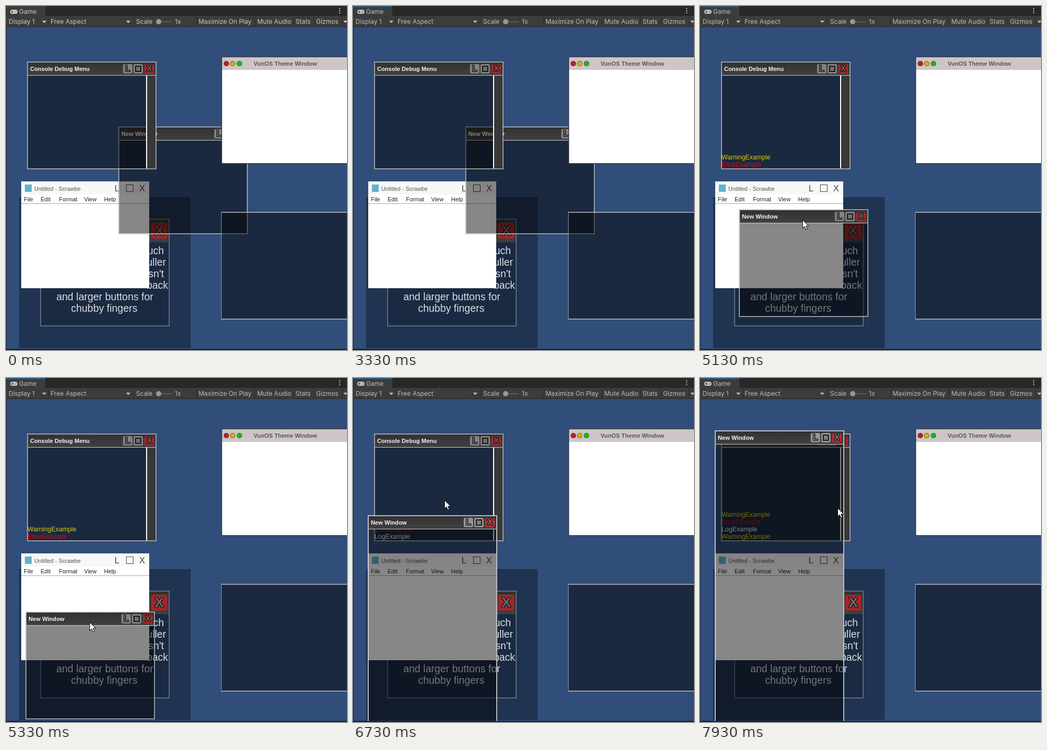
Recreate the animation shown at these times as an HTML page. Size 650x657 px, loop 8000 ms.

```html
<!DOCTYPE html>
<html lang="en">
<head>
<meta charset="utf-8">
<title>Game view</title>
<style>
  *, *::after { box-sizing: border-box; }
  html, body { margin: 0; width: 100%; height: 100%; overflow: hidden; background: #191919; }
  #stage { position: relative; width: 650px; height: 657px; overflow: hidden; background: #151d2c;
    font-family: "Liberation Sans", Arial, sans-serif; }
  #stage div, #stage span, #stage svg { position: absolute; white-space: pre; }

  /* editor bars */
  #bars { inset: 0 0 auto 0; height: 40px; background: #282828; color: #cacaca;
    font: 12px/16px Inter, sans-serif; }
  #bars.dim { color: #bdbdbd; }
  #tab { left: 1px; top: 0; width: 74px; height: 20px; background: #3c3c3c; }
  #tab.focus { border-top: 2px solid #2c5d87; }
  #tools { left: 0; top: 19px; width: 650px; height: 21px; background: #3c3c3c; border-bottom: 1px solid #232323; }
  #bars span { top: 22px; }
  #bars i { position: absolute; top: 20px; width: 1px; height: 19px; background: #2a2a2a; }
  #bars svg { left: 0; top: 0; }

  /* game view */
  #view { inset: 0; background: #314d79; clip-path: inset(40px 0 2px 1px); }
  .win { width: 247px; height: 206px; background: rgba(0,0,0,.47); border: 2px solid rgba(255,255,255,.55); }
  .win.lit { border-color: rgba(255,255,255,.7); }
  .bar { left: 0; right: 0; top: 0; height: 25px; border-bottom: 1px solid #c9ccd0;
    background: linear-gradient(#323232, #404040); color: #f2f2f2; font: bold 11.1px/24px "Liberation Sans", Arial, sans-serif; }
  .bar > span { left: 4px; }
  .btn { top: 3px; width: 18px; height: 18px; border-radius: 3px; background: #828282;
    color: #686868; font: bold 16px/18px "Liberation Sans", Arial, sans-serif; text-align: center;
    text-shadow: 1px 0 #111, -1px 0 #111, 0 1px #111, 0 -1px #111, 1px 1px #111, -1px -1px #111, 1px -1px #111, -1px 1px #111; }
  .btn:nth-child(2) { left: 181px; }
  .btn:nth-child(3) { left: 201px; }
  .btn:nth-child(4) { left: 222px; }
  .btn.max::after { content: ""; position: absolute; left: 3px; top: 3px; width: 12px; height: 12px; border: 2px solid #161616; background: #6e6e6e; }
  .btn.x { background: #aa2428; }
  .lit .btn { filter: brightness(1.14); }

  #logs { left: 0; bottom: 0; width: 224px; font-size: 12.3px; line-height: 14px; }
  #logs p { margin: 0 0 0 -1px; }
  .warn { color: #dccd0c; }
  .err { color: #d60c14; }
  .log { color: #eceef0; }
  #scroll { right: 0; top: 25px; bottom: 0; width: 18px; background: #383838; border-left: 2px solid #fff; }

  #shade { left: 25px; top: 365px; width: 327px; height: 288px; background: rgba(0,0,0,.34); }
  #touch { left: 65px; top: 406px; width: 247px; height: 206px; background: rgba(0,0,0,.18);
    border: 2px solid rgba(255,255,255,.3); color: #dadde0; font-size: 19.45px; line-height: 22px; }
  #touch .bar { height: 43px; border: 0; }
  #touch .btn { left: 210px; top: 6px; width: 30px; height: 30px; border-radius: 4px; font-size: 28px; line-height: 30px; }
  #touch > span { width: max-content; }

  #note { left: 29px; top: 335px; width: 244px; height: 204px; background: #fff; color: #222; font-size: 11px; line-height: 16px; }
  #note .head { left: 0; top: 0; width: 244px; height: 25px; background: #f8f8f8; }
  #note .rule { left: 0; top: 42px; width: 244px; height: 1px; background: #a8a8a8; }
  #note .icon { left: 7px; top: 6px; width: 13px; height: 14px; background: #62b3c9; }
  #note .box { left: 200px; top: 6px; width: 14px; height: 14px; border: 1px solid #444; }
  #note .big { top: 5px; font-size: 16.5px; color: #444; }
  #note .menu { top: 26px; }

  #light { left: 411px; top: 97px; width: 260px; height: 204px; background: #fff; border: 1px solid #4c4c50;
    border-radius: 4px 0 0 2px; box-shadow: 0 0 0 1px rgba(60,60,64,.45); }
  #light .head { left: 0; top: 0; width: 258px; height: 24px; border-radius: 3px 0 0 0; background: #cdc5c6; color: #56565a;
    font: bold 11.1px/24px "Liberation Sans", Arial, sans-serif; }
  #light .dot { top: 7px; width: 10px; height: 10px; border-radius: 50%; border: 1px solid rgba(40,30,30,.6); }
  #panel { left: 410px; top: 393px; width: 260px; height: 206px; background: rgba(0,0,0,.47);
    border: 2px solid rgba(255,255,255,.55); border-left-width: 1px; }
  #stage svg.cursor { left: 0; top: 0; z-index: 2; overflow: visible; }
</style>
</head>
<body>
<div id="stage">
  <div id="view">
    <div id="shade"></div>
    <div id="touch">
      <div class="bar"><div class="btn x">X</div></div>
      <span style="right:9px;top:48px">suits touch</span>
      <span style="right:5px;top:70px">has a fuller</span>
      <span style="right:9px;top:92px">and doesn't</span>
      <span style="right:1px;top:114px">back</span>
      <span style="left:29px;top:136px">and larger buttons for</span>
      <span style="left:57px;top:158px">chubby fingers</span>
    </div>
    <div id="note">
      <div class="head"></div>
      <div class="icon"></div>
      <span style="left:25px;top:6px;font-size:10.8px;color:#555">Untitled - Scrawbe</span>
      <span class="big" style="left:178px">L</span>
      <div class="box"></div>
      <span class="big" style="left:225px">X</span>
      <span class="menu" style="left:5px">File</span>
      <span class="menu" style="left:37px">Edit</span>
      <span class="menu" style="left:72px">Format</span>
      <span class="menu" style="left:120px">View</span>
      <span class="menu" style="left:158px">Help</span>
      <div class="rule"></div>
    </div>
    <div id="fresh" class="win">
      <div class="bar"><span>New Window</span><div class="btn">L</div><div class="btn max"></div><div class="btn x">X</div></div>
    </div>
    <div class="win" style="left:40px;top:106px">
      <div class="bar"><span>Console Debug Menu</span><div class="btn">L</div><div class="btn max"></div><div class="btn x">X</div></div>
      <div id="logs"></div>
      <div id="scroll"></div>
    </div>
    <div id="light">
      <div class="head"><span style="left:60px">VunOS Theme Window</span></div>
      <div class="dot" style="left:3px;background:#b8222b"></div>
      <div class="dot" style="left:15px;background:#d9ae14"></div>
      <div class="dot" style="left:28px;background:#16bd1c"></div>
    </div>
    <div id="panel"></div>
    <svg id="arrow" class="cursor" width="13" height="20">
      <path d="M.5 .5V16.5L4.2 13L6.7 19L9.4 17.9L6.9 12H12Z" fill="#fff" stroke="#000"/>
    </svg>
    <svg id="sizer" class="cursor" width="11" height="23">
      <path d="M0 -11L5 -6H1.5V6H5L0 11L-5 6H-1.5V-6H-5Z" fill="#fff" stroke="#000"/>
    </svg>
  </div>

  <div id="bars">
    <div id="tab"></div>
    <div id="tools"></div>
    <span style="left:25px;top:3px">Game</span>
    <span style="left:5px">Display 1</span>
    <span style="left:85px">Free Aspect</span>
    <span style="left:248px">Scale</span>
    <span style="left:322px">1x</span>
    <span style="left:367px">Maximize On Play</span>
    <span style="left:479px">Mute Audio</span>
    <span style="left:552px">Stats</span>
    <span style="left:591px">Gizmos</span>
    <i style="left:81px"></i><i style="left:242px"></i><i style="left:363px"></i><i style="left:474px"></i>
    <i style="left:548px"></i><i style="left:586px"></i><i style="left:640px"></i>
    <svg width="650" height="40" fill="currentColor">
      <path d="M69 28h8l-4 4.5zM229 28h8l-4 4.5zM643 28h8l-4 4.5z"/>
      <path d="M635 4h2v2h-2zM635 8h2v2h-2zM635 12h2v2h-2z"/>
      <path d="M295 29.5h21v1.5h-21z" fill="#666"/>
      <circle cx="291" cy="30" r="5" fill="#999"/>
      <rect x="8" y="7" width="14" height="8" rx="4"/>
      <path d="M10 11h4M12 9v4M17 11.7h1M19 10h1" stroke="#3c3c3c" stroke-width="1.2"/>
    </svg>
  </div>
</div>

<script>
const $ = id => document.getElementById(id);
const LOOP = 8000, FPS = 15;

// rows of [tick, x, y]
const winPath = [[72, 214, 230], [73, 210, 238], [77, 74, 388], [79, 46, 432], [81, 28, 460],
  [97, 28, 460], [98, 28, 444], [99, 28, 398], [103, 28, 126], [104, 28, 78], [105, 28, 52], [106, 28, 42],
  [108, 28, 42], [109, 28, 74], [110, 28, 100]];
const pointer = [[61, 341, 469], [64, 340, 400], [67, 337, 262], [68, 336, 239], [69, 336, 249], [72, 336, 249],
  [73, 332, 257], [77, 195, 408], [79, 167, 452], [81, 150, 480], [84, 181, 471], [85, 181, 471],
  [86, 178, 470], [87, 178, 470], [88, 177, 463], [92, 177, 463], [93, 176, 458], [97, 176, 458],
  [98, 176, 420], [99, 175, 365], [103, 172, 100], [104, 171, 61], [105, 173, 46], [106, 174, 40],
  [108, 174, 40], [109, 178, 72], [110, 180, 97], [111, 180, 97], [112, 190, 112], [114, 238, 190],
  [116, 271, 245], [117, 271, 245], [118, 267, 247], [119, 262, 248]];
const logs = [[61, "warn", "Warning"], [76, "err", "Error"], [91, "log", "Log"], [106, "warn", "Warning"]];

function at(path, tick) {
  const next = path.findIndex(p => p[0] > tick);
  if (next === 0) return path[0].slice(1);
  if (next < 0) return path[path.length - 1].slice(1);
  const a = path[next - 1], b = path[next];
  const k = (tick - a[0]) / (b[0] - a[0]);
  return [1, 2].map(i => Math.round(a[i] + (b[i] - a[i]) * k));
}

const lines = logs.map(([tick, kind, word]) => {
  const p = document.createElement("p");
  p.className = kind;
  p.textContent = word + "Example";
  $("logs").append(p);
  return [tick, p];
});

function place(el, shown, [x, y]) {
  el.style.display = shown ? "" : "none";
  el.style.transform = `translate(${x}px, ${y}px)`;
}

function draw(tick) {
  $("bars").classList.toggle("dim", tick >= 16);
  $("tab").classList.toggle("focus", tick >= 50);
  for (const [start, p] of lines) p.style.display = tick >= start ? "" : "none";

  const [x, y] = at(winPath, tick), win = $("fresh");
  win.style.left = x + "px";
  win.style.top = y + "px";
  win.style.height = (tick < 98 ? 206 : 666 - y) + "px";
  win.style.zIndex = tick >= 72 ? 1 : "auto";
  win.classList.toggle("lit", tick >= 98);

  const tip = at(pointer, tick);
  const sizing = (tick >= 93 && tick < 98) || tick === 110 || tick === 111;
  place($("arrow"), tick >= 61 && !sizing, tip);
  place($("sizer"), sizing, tip);
}

const start = performance.now();
let last = -1;
function loop() {
  const t = Math.max(0, performance.now() - start) % LOOP;
  const tick = Math.min(119, Math.floor((t + 5) * FPS / 1000));
  if (tick !== last) draw(last = tick);
  requestAnimationFrame(loop);
}
loop();
</script>
</body>
</html>
```
